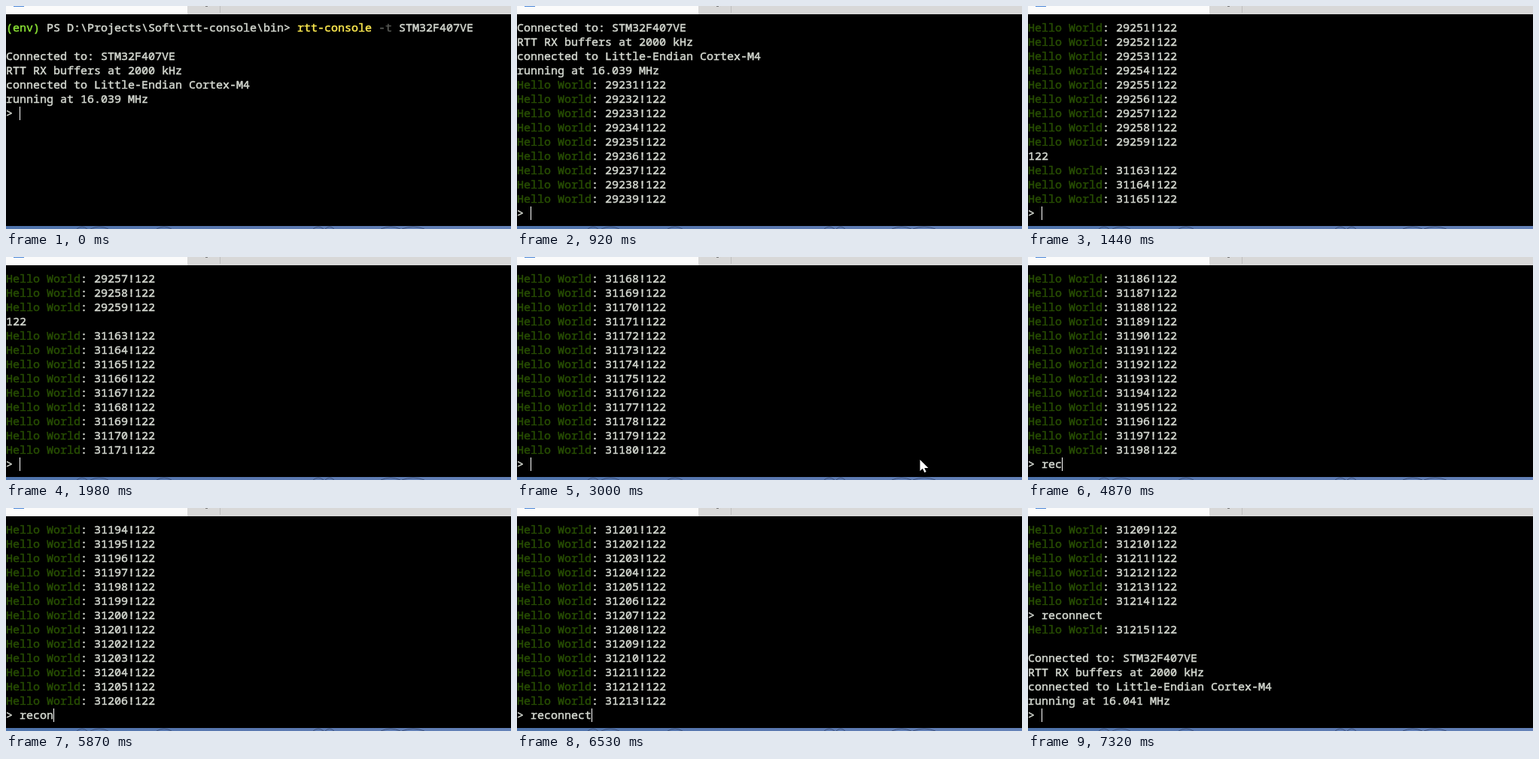
Recreate the animation shown at these times as an HTML page with a canvas. Size 671 by 297 pixels, loop 8000 ms.

```html
<!DOCTYPE html>
<html lang="en">
<head>
<meta charset="utf-8">
<title>RTT console</title>
<style>
  html, body { margin: 0; width: 100%; height: 100%; overflow: hidden; background: #000; }
  canvas { display: block; }
</style>
</head>
<body>
<canvas id="stage" width="671" height="297"></canvas>
<script>
const ctx = document.getElementById('stage').getContext('2d');
const LOOP = 8000, CELL = 9, ROW = 19, TOP = 20, BASE = 14, LOG_ROWS = 13;
const C = {
  text: '#d3d7cf', env: '#8ae234', cmd: '#fce94f', flag: '#555753', hello: '#274d03'
};

// A line is a list of [text, colour] runs.
const plain = s => [[s, C.text]];
const hello = n => [['Hello World', C.hello], [`: ${n}!122`, C.text]];
const hellos = (from, to) =>
  Array.from({ length: to - from + 1 }, (_, i) => hello(from + i));
const banner = mhz => [
  '', 'Connected to: STM32F407VE', 'RTT RX buffers at 2000 kHz',
  'connected to Little-Endian Cortex-M4', `running at ${mhz} MHz`
].map(plain);

const intro = [
  [['(env)', C.env], [' PS D:\\Projects\\Soft\\rtt-console\\bin> ', C.text],
   ['rtt-console', C.cmd], [' -t', C.flag], [' STM32F407VE', C.text]],
  ...banner('16.039')
];

// The screen refreshes only at these moments.
const spread = (a, b, n) =>
  Array.from({ length: n }, (_, i) => Math.round((a + (b - a) * i / (n - 1)) / 10) * 10);
const ticks = [
  0, 500, 650, 920, ...spread(1170, 1860, 6), ...spread(1980, 3000, 9),
  ...spread(3150, 4090, 8), ...spread(4210, 4870, 5), 5010, 5160,
  ...spread(5330, 5870, 5), ...spread(5990, 6260, 3), 6410, 6530, 6810, 7060, 7320
];

const countKeys = [
  [1170, 31164], [1980, 31171], [3000, 31180], [4870, 31198], [5870, 31206], [6530, 31213]
];
function counter(t) {
  let i = 1;
  while (i < countKeys.length - 1 && t > countKeys[i][0]) i++;
  const [t0, n0] = countKeys[i - 1], [t1, n1] = countKeys[i];
  return Math.round(n0 + (n1 - n0) * Math.min(1, (t - t0) / (t1 - t0)));
}

const WORD = 'reconnect';
const keyTimes = [4370, 4690, 4860, 5330, 5730, 5990, 6120, 6260, 6410];

function logAt(t) {
  if (t < 920) return intro;
  if (t < 1170) return [...intro, ...hellos(29231, 29239)];
  if (t < 6810) {
    return [...hellos(29240, 29259), plain('122'), ...hellos(31163, counter(t))];
  }
  const log = [...hellos(31190, 31214), plain('> ' + WORD), hello(31215)];
  if (t < 7060) return log;
  const tail = banner('16.041');
  return [...log, ...(t < 7320 ? tail.slice(0, 2) : tail)];
}

function rect(color, x, y, w, h) {
  ctx.fillStyle = color;
  ctx.fillRect(x, y, w, h);
}

// A thin outline gives the strokes a medium weight.
function drawLine(runs, row) {
  const y = TOP + row * ROW + BASE;
  let x = 0;
  for (const [s, color] of runs) {
    ctx.fillStyle = ctx.strokeStyle = color;
    ctx.fillText(s, x, y);
    ctx.strokeText(s, x, y);
    x += s.length * CELL;
  }
}

function drawTabs() {
  rect('#d8d8d8', 0, 0, 671, 11);
  rect('#fbfbfb', 0, 0, 241, 11);
  rect('#bdbdbd', 284, 0, 1, 9);
  rect('#777', 265, 0, 3, 1);
  rect('#4a86d8', 10, 0, 14, 1);
}

function drawWallpaper() {
  const g = ctx.createLinearGradient(0, 0, 671, 0);
  g.addColorStop(0, '#4f74ac');
  g.addColorStop(0.5, '#5a78b0');
  g.addColorStop(1, '#6482b8');
  rect(g, 0, 293, 671, 4);
  ctx.strokeStyle = '#34466c';
  ctx.lineWidth = 0.8;
  ctx.beginPath();
  for (const [x, w] of [[94, 14], [112, 24], [200, 20], [408, 14], [424, 12], [498, 26], [526, 30]]) {
    ctx.moveTo(x, 297);
    ctx.quadraticCurveTo(x + w / 2, 291, x + w, 297);
  }
  ctx.stroke();
}

function drawPointer(x, y) {
  ctx.save();
  ctx.translate(x, y);
  ctx.fillStyle = '#fff';
  ctx.beginPath();
  [[0, 0], [0, 15], [3.4, 11.8], [6, 17], [8.2, 16], [5.8, 11], [11, 11]]
    .forEach(p => ctx.lineTo(...p));
  ctx.fill();
  ctx.restore();
}

function draw(t) {
  rect('#000', 0, 0, 671, 297);
  drawTabs();
  drawWallpaper();

  ctx.font = '500 15px "Noto Sans Mono", monospace';
  ctx.textBaseline = 'alphabetic';
  ctx.lineWidth = 0.5;
  ctx.lineJoin = 'round';
  const log = logAt(t).slice(-LOG_ROWS);
  log.forEach(drawLine);

  const typed = t < 6810 ? WORD.slice(0, keyTimes.filter(k => k <= t).length) : '';
  drawLine(plain('> ' + typed), log.length);
  rect('#fff', (2 + typed.length) * CELL, TOP + log.length * ROW, 1, 18);

  if (t >= 500 && t < 650) drawPointer(594, 268);
  if (t >= 3000 && t < 3150) drawPointer(535.5, 270);
}

const start = performance.now();
let shown = -1;
function loop() {
  const t = (performance.now() - start) % LOOP;
  const tick = ticks.filter(k => k <= t).pop();
  if (tick !== shown) draw(shown = tick);
  requestAnimationFrame(loop);
}
loop();
</script>
</body>
</html>
```
